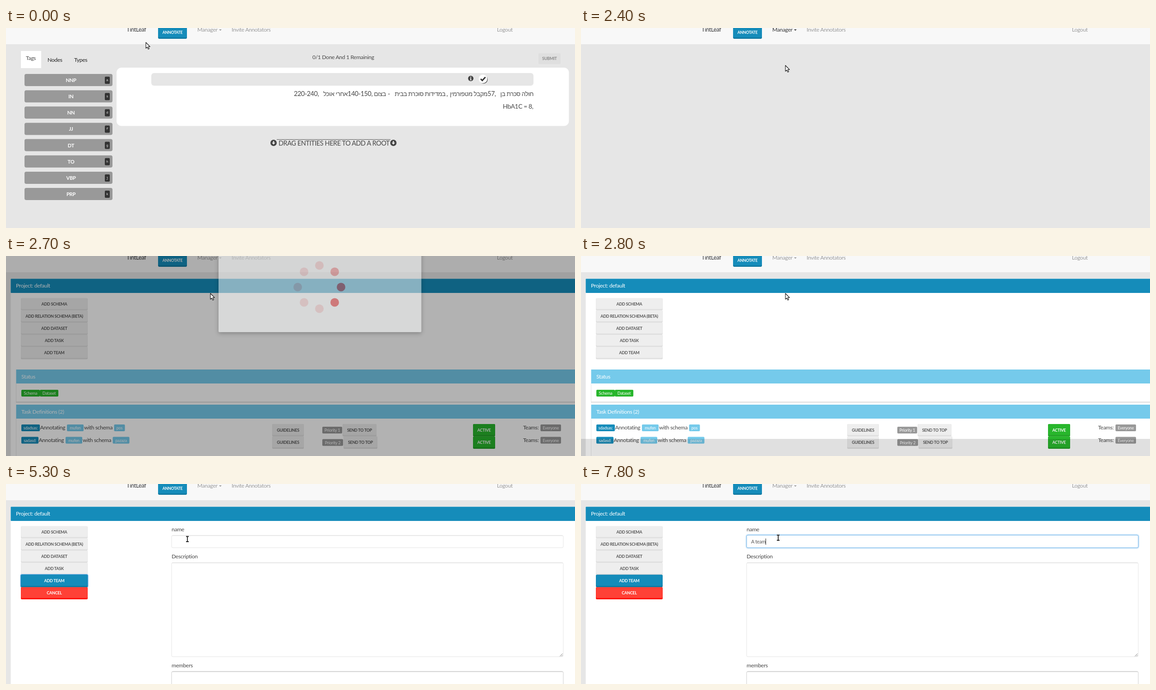
An HTML page for the animation above (8000 ms loop, 1261 by 444 pixels).

```html
<!DOCTYPE html>
<html lang="en">
<head>
<meta charset="utf-8">
<title>Annotation project walkthrough</title>
<style>
html, body { margin: 0; width: 100%; height: 100%; overflow: hidden; background: #e6e6e6; }
svg { display: block; font-family: Lato, "Open Sans", "Liberation Sans", sans-serif; }
text { letter-spacing: -.03em; white-space: pre; }
.mono { font-family: "Liberation Mono", monospace; letter-spacing: 0; }
.shadow { filter: drop-shadow(0 3px 5px rgba(0,0,0,.5)); }
.soft { filter: drop-shadow(0 2px 2px rgba(0,0,0,.15)); }
</style>
</head>
<body>
<svg id="stage" width="1261" height="444" viewBox="0 0 1261 444"></svg>
<script>
const BLUE = '#158cba', SKY = '#75caeb', GREEN = '#28b62c', GREY = '#999', INK = '#484848';

const rect = (x, y, w, h, fill, r = 0, more = '') =>
  `<rect x="${x}" y="${y}" width="${w}" height="${h}" rx="${r}" fill="${fill}" ${more}/>`;
const text = (x, y, s, size = 12.2, fill = INK, more = '') =>
  `<text x="${x}" y="${y}" font-size="${size}" fill="${fill}" ${more}>${s}</text>`;
const mid = 'text-anchor="middle"', bold = 'font-weight="700"', end = 'text-anchor="end"';
const path = (d, fill, more = '') => `<path d="${d}" fill="${fill}" ${more}/>`;
const circle = (x, y, r, fill, more = '') => `<circle cx="${x}" cy="${y}" r="${r}" fill="${fill}" ${more}/>`;
const group = (id, body, more = '') => `<g id="${id}" ${more}>${body}</g>`;

// Raised button: a darker lip under the face
const button = (x, y, w, h, label, face = '#eee', lip = '#e0e0e0', ink = '#555', r = 2, more = '') =>
  rect(x, y, w, h, lip, r) + rect(x + .5, y, w - 1, h - 3, face, r) +
  text(x + w / 2, y + h / 2 + 2.8, label, 9, ink, `${mid} ${bold} ${more}`);
const badge = (x, y, w, label, fill) =>
  rect(x, y, w, 15, fill, 2) + text(x + w / 2, y + 11, label, 9.2, '#fff', mid);

function nav() {
  return rect(0, 0, 1261, 36, '#f8f8f8') +
    text(267, 8, 'TintLeaf', 13, '#333') +
    rect(337, -10, 64, 34, '#127ba3', 3) + rect(337, -10, 64, 31, BLUE, 3) +
    text(369, 13, 'ANNOTATE', 8.7, '#fff', `${mid} ${bold}`) +
    group('manager', text(424, 8, 'Manager', 12.2, 'inherit') + path('M472 3h6l-3 3z', 'inherit')) +
    text(500, 8, 'Invite Annotators', 12.2, GREY) +
    text(1088, 8, 'Logout', 12.2, GREY);
}

function home() {
  const tags = ['NNP', 'IN', 'NN', 'JJ', 'DT', 'TO', 'VBP', 'PRP'].map((tag, i) => {
    const y = 102 + i * 36.15;
    return rect(41, y, 195, 27, GREY, 4) +
      text(144, y + 18, tag, 11.2, '#fff', `${mid} ${bold}`) +
      rect(219, y + 6, 11, 16, '#333', 2) +
      text(224.5, y + 16, 'asdfghjk'[i], 8, '#ddd', `${mid} class="mono"`);
  }).join('');
  const down = x => circle(x, 255, 7, '#444') +
    path(`M${x - 1.3} 251h2.6v3.6h2.6l-3.9 4.4l-3.9-4.4h2.6z`, '#e6e6e6');
  const words = [
    [1169, 'חולה סכרת בן'], [1067, 'מקבל מטפורמין'], [974, 'במדידות סוכרת בבית'],
    [842, 'בצום'], [757, 'אחרי אוכל']
  ].map(([x, s]) => text(x, 151, s, 13.5, INK, end)).join('');
  const figures = [[1067, '57,'], [976, ','], [846, '-'], [757, '140-150,'], [638, '220-240,']]
    .map(([x, s]) => text(x, 151, s, 14.4)).join('');
  return rect(33, 51, 45, 38, '#fff') + text(44, 71, 'Tags') +
    text(92, 75, 'Nodes', 12.2, '#222') + text(151, 75, 'Types', 12.2, '#222') +
    text(679, 69, '0/1 Done And 1 Remaining') +
    rect(1180, 56, 49, 24, '#dfdfdf', 2) + text(1204.5, 71, 'SUBMIT', 9, '#888', `${mid} ${bold}`) +
    tags +
    rect(245, 88, 1002.5, 129.5, '#fff', 11) +
    rect(322, 100, 847, 28, '#e6e6e6', 6) +
    circle(1030, 112, 6, '#444') + path('M1029 108h2v2h-2zM1028.300 111h2.700v4h1v1h-4v-1h1v-3h-.7z', '#e6e6e6') +
    circle(1058.500, 114.500, 9, '#555') + circle(1057, 113, 9.5, '#fff') +
    path('M1052 113l3.500 3.500l7-7.500', 'none', 'stroke="#333" stroke-width="3"') +
    words + figures + text(1101, 179, 'HbA1C = 8,', 14) +
    rect(600, 247, 252, 1, '#555') + down(593) + down(858.5) +
    text(604, 261, 'DRAG ENTITIES HERE TO ADD A ROOT', 14.5);
}

const menu = () =>
  rect(413.500, 34.500, 134, 73, '#fff', 2, 'stroke="#e7e7e7" class="soft"') +
  text(428, 60, 'Create new project', 12.2, GREY, 'id="item1"') +
  text(428, 86, 'Open default', 12.2, GREY, 'id="item2"');

function panel() {
  const names = ['ADD SCHEMA', 'ADD RELATION SCHEMA (BETA)', 'ADD DATASET', 'ADD TASK', 'ADD TEAM'];
  return rect(10.5, 50, 1260, 420, '#fff') + rect(10.5, 50.5, 1260, 31.5, BLUE, 1) +
    text(22, 70, 'Project: default', 12.2, '#fff') +
    names.map((s, i) => button(33, 93.7 + i * 27.1, 148, 27.1, s, '#eee', '#e0e0e0', '#555', 2,
      i === 4 ? 'id="addTeam"' : '')).join('');
}

function tasks() {
  const head = (y, s) => rect(22.5, y, 1260, 31, SKY) + text(34, y + 19.5, s, 12.2, '#fff');
  const side = (y, h) => rect(22, y, 1, h, '#e5e5e5');
  const row = (y, name, w, schema, sw, pw, n) => {
    const x = 34 + w;
    return badge(34, y + 1, w, name, BLUE) + text(x + .5, y + 12, 'Annotating') +
      badge(x + 60, y + 1, 37, 'mufen', SKY) + text(x + 98, y + 12, 'with schema') +
      badge(x + 164.500, y + 1, sw, schema, SKY) +
      button(590, y, 70, 27.5, 'GUIDELINES') + badge(701, y + 6, pw, 'Priority ' + n, GREY) +
      button(702 + pw, y, 75, 27.5, 'SEND TO TOP') +
      button(1035, y, 49, 27.5, 'ACTIVE', GREEN, '#23a127', '#fff') +
      text(1146, y + 12, 'Teams:') + badge(1184.5, y + 1, 45.5, 'Everyone', GREY);
  };
  return head(252, 'Status') + side(283, 43) + rect(22, 323, 1239, 3, '#e5e5e5') +
    badge(34, 297, 41, 'Schema', GREEN) + badge(75, 297, 41, 'Dataset', GREEN) +
    head(330, 'Task Definitions (2)') + side(361, 83) +
    row(373, 'sdadsas:', 41, 'pos', 24, 44, 1) + row(400.500, 'sadasd:', 38, 'pazaza', 37, 46, 2);
}

const pressed = () =>
  rect(33, 202, 148, 27, '#c4c4c4', 2, `stroke="#6f9fd8" stroke-width="1.5"`) +
  text(107, 219, 'ADD TEAM', 9, '#444', `${mid} ${bold}`);

function form() {
  const box = (y, h, line) => rect(367, y, 868, h, '#fff', 3, `stroke="${line}"`) +
    rect(368, y, 866, 1.3, line);
  return group('ring', rect(32.500, 201, 149, 28, 'none', 3, 'stroke="#66afe9" stroke-width="2"')) +
    button(33, 201.5, 148, 27.5, 'ADD TEAM', BLUE, '#127ba3', '#fff') +
    button(33, 229, 148, 27, 'CANCEL', '#ff4136', '#ff1103', '#fff') +
    text(367, 105, 'name') + box(114, 27.5, '#e4e4e4') +
    group('focus', rect(367, 113.5, 868, 28, 'none', 3, 'stroke="#66afe9" stroke-opacity=".25" stroke-width="5"') +
      rect(367, 113.5, 868, 28, '#fff', 3, 'stroke="#66afe9"')) +
    text(377, 132, '', 11, '#555', 'id="typed"') + rect(376, 121, 1, 14, '#222', 0, 'id="caret"') +
    text(367, 165, 'Description') + box(174.500, 209, '#e4e4e4') +
    path('M1227.500 382.500l6-6M1231 382.500l2.500-2.500', 'none', 'stroke="#777"') +
    text(367, 407, 'members') + box(416, 40, '#ccc') +
    group('popup', rect(367.500, 142.500, 868, 34, '#fff', 0, 'stroke="#ccc" class="soft"') +
      text(377, 164, 'asda', 11, '#333'));
}

function modal() {
  const dots = Array.from({ length: 8 }, (_, i) => {
    const a = i * Math.PI / 4;
    return circle(694.500 + 48 * Math.cos(a), 109 + 48 * Math.sin(a), 9.5, '#eb4144', 'class="dot"');
  }).join('');
  return rect(471, -40, 449.5, 249, '#fcfefe', 2, 'class="shadow"') +
    text(471, 5, 'Talking to the server', 13.8, '#333') + dots;
}

const outline = 'stroke="#111" stroke-width="1.1" stroke-linejoin="round"';
const cursors =
  group('arrow', path('M0 0v13l3-2.700 2.200 4.700 2.200-1-2.200-4.500h4z', '#fff', outline)) +
  group('hand', path('M-1 .8Q0-.5 1 .8V5l5 1q1 .3 1 1.500V10l-1.500 3h-6L-5 7.500q0-1.500 1.500-1L-1 8.500z', '#fff', outline) +
    path('M3 5.500v2M5 6v2', 'none', 'stroke="#111" stroke-width=".8"')) +
  group('beam', path('M-3-5.500h2.200l.8.7.8-.7H3M-3 6h2.200l.8-.7.8.7H3M0-5V5.500', 'none',
    'stroke="#222" stroke-width="1.8"'));

document.getElementById('stage').innerHTML =
  group('nav', nav()) + group('home', home()) + group('menu', menu()) +
  group('project', panel() + group('tasks', tasks()) + group('pressed', pressed()) + group('form', form())) +
  rect(0, 0, 1261, 444, '#000', 0, 'id="shade"') + group('modal', modal()) + group('pointer', cursors);

const $ = id => document.getElementById(id);
const show = (id, on) => { $(id).style.display = on ? '' : 'none'; };
const dots = document.querySelectorAll('.dot');

// time, x, y of the pointer's hot spot
const route = [
  [0, 310, 32], [500, 449, 7], [800, 449, 7], [900, 450, 8], [1000, 450, 8], [1600, 454, 85],
  [1700, 454, 85], [1900, 453, 83], [3100, 453, 83], [4000, 155, 213], [4100, 152, 217],
  [4900, 152, 217], [5300, 402, 122], [5800, 431, 121], [5900, 437, 119], [8000, 437, 119]
];
const typing = [[7000, 'A'], [7200, 'A\u00a0'], [7300, 'A t'], [7500, 'A te'], [7600, 'A tea'], [7800, 'A team']];
const trail = [1, .25, .25, .25, .25, .28, .6, .85];

function pointerAt(t) {
  const i = route.findIndex(k => k[0] > t);
  const [t0, x0, y0] = route[i - 1], [t1, x1, y1] = route[i];
  const u = (t - t0) / (t1 - t0), e = u * u * (3 - 2 * u);
  return [Math.round(x0 + (x1 - x0) * e), Math.round(y0 + (y1 - y0) * e)];
}

function draw(t) {
  const within = (a, b) => t >= a && t < b;
  const [x, y] = pointerAt(t);

  $('manager').setAttribute('fill', within(400, 2500) ? '#333' : GREY);
  show('home', t < 2100);
  show('menu', within(700, 2100));
  $('item1').setAttribute('fill', within(700, 2100) && y > 42 && y < 66 ? '#333' : GREY);
  $('item2').setAttribute('fill', y >= 66 ? '#333' : GREY);

  show('project', t >= 2500);
  show('tasks', t < 4500);
  show('pressed', within(4400, 4500));
  $('addTeam').setAttribute('fill', within(3900, 4400) ? '#333' : '#555');
  show('form', t >= 4500);
  show('ring', t < 5700);
  show('focus', t >= 5700);
  show('popup', within(7100, 7300));

  const typed = typing.reduce((s, [at, v]) => t >= at ? v : s, '');
  $('typed').textContent = typed;
  const width = typed ? $('typed').getComputedTextLength() : -1;
  $('caret').setAttribute('x', Math.round(377 + width));
  show('caret', within(5700, 6200) || t >= 6800);

  // The backdrop clears from the top before it is gone
  show('shade', within(2500, 2900));
  $('shade').setAttribute('y', t < 2800 ? 0 : 406);
  $('shade').setAttribute('opacity', t < 2700 ? .5 : t < 2800 ? .3 : .12);
  show('modal', within(2500, 2800));
  $('modal').setAttribute('opacity', t < 2700 ? 1 : .5);
  $('modal').setAttribute('transform', `translate(0 ${t < 2700 ? 0 : -40})`);
  const lead = Math.floor((t - 2600) / 100);
  dots.forEach((d, i) => d.setAttribute('opacity', trail[(i - lead + 16) % 8 | 0] ?? .25));

  const hand = within(400, 2100) || within(3900, 5000);
  show('hand', hand);
  show('beam', t >= 5300);
  show('arrow', !hand && t < 5300);
  $('pointer').setAttribute('transform', `translate(${x} ${y})`);
}

const start = performance.now();
function tick(now) {
  const t = Math.max(0, now - start) % 8000;
  draw(Math.floor(t / 100) * 100);
  requestAnimationFrame(tick);
}
draw(0);
requestAnimationFrame(tick);
</script>
</body>
</html>
```
